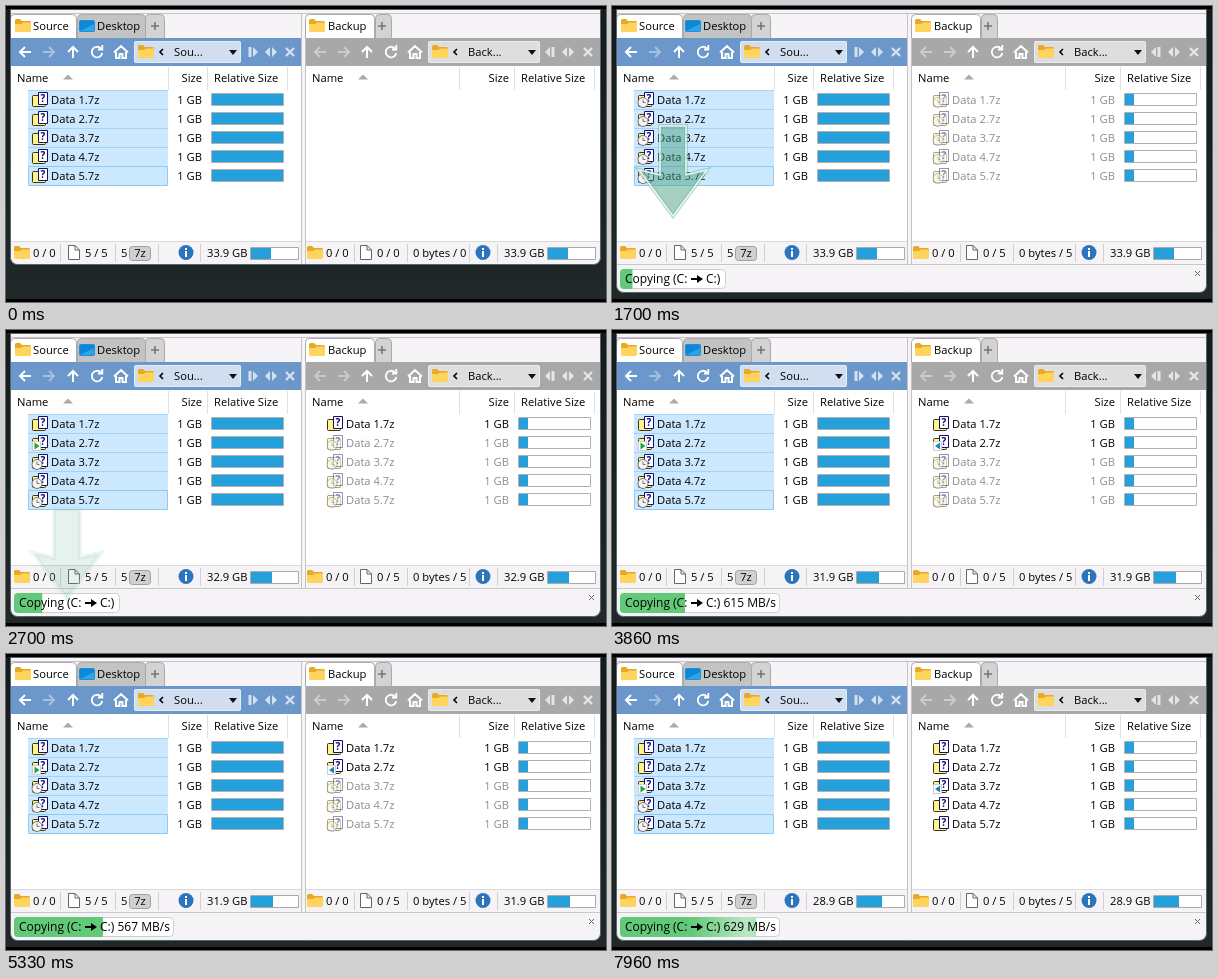
An HTML page with a canvas for the animation above (8 s loop, 600 by 296 pixels).

```html
<!DOCTYPE html>
<html>
<head>
<meta charset="utf-8">
<style>
html, body { margin: 0; width: 600px; height: 296px; overflow: hidden; background: #000; }
canvas { display: block; }
</style>
</head>
<body>
<canvas id="stage" width="600" height="296"></canvas>
<script>
const LOOP = 8000;
const c = document.getElementById('stage').getContext('2d');
const FONT = '11.2px "Open Sans", sans-serif';
const JOB_FONT = '12px "Open Sans", sans-serif';
const BLUE = '#26a0da';

// Progress fraction, free space and speed over time, as [ms, value]
const PROGRESS = [[1560, .08], [2100, .226], [3200, .3], [3860, .406], [4000, .43], [5330, .556],
  [5630, .556], [6030, .575], [6130, .6], [6330, .6], [7100, .756], [7960, .85]];
const FREE = [[0, 33.9], [1900, 32.9], [3300, 31.9], [5800, 30.9], [7350, 29.9], [7700, 28.9]];
const SPEED = [[0, ''], [3350, '615 MB/s'], [4300, '598 MB/s'], [4860, '567 MB/s'],
  [6400, '1.23 GB/s'], [7500, '629 MB/s']];
// Start and end of copying per file, as seen in each pane
const SOURCE_TIMES = [[2400, 2400], [2400, 5650], [5650, 9e9], [9e9, 9e9], [9e9, 9e9]];
const TARGET_TIMES = [[1800, 1800], [3250, 5700], [5700, 9e9], [7350, 7350], [7700, 7700]];

const stepAt = (steps, t) => steps.filter(s => s[0] <= t).pop()[1];

function lerpAt(points, t) {
  if (t <= points[0][0]) return points[0][1];
  const i = points.findIndex(p => p[0] > t);
  if (i < 0) return points[points.length - 1][1];
  const [t0, a] = points[i - 1], [t1, b] = points[i];
  return a + (b - a) * (t - t0) / (t1 - t0);
}

function rect(x, y, w, h, fill) {
  c.fillStyle = fill;
  c.fillRect(x, y, w, h);
}

function box(x, y, w, h, fill, stroke, radius = 0) {
  c.beginPath();
  c.roundRect(x + .5, y + .5, w - 1, h - 1, radius);
  c.fillStyle = fill;
  c.fill();
  c.strokeStyle = stroke;
  c.lineWidth = 1;
  c.stroke();
}

function text(s, x, y, color = '#000', align = 'left', font = FONT) {
  c.font = font;
  c.textAlign = align;
  c.fillStyle = color;
  c.fillText(s, x, y);
}

function shape(d, x, y, fill, stroke, width = 1) {
  const p = new Path2D(d);
  c.save();
  c.translate(x, y);
  if (fill) { c.fillStyle = fill; c.fill(p); }
  if (stroke) { c.strokeStyle = stroke; c.lineWidth = width; c.stroke(p); }
  c.restore();
}

function folder(x, y) {
  shape('M0 1.5Q0 0 1.5 0H5L7 2H14.5Q16 2 16 3.5V11H0Z', x, y, '#e9a825');
  shape('M0 5H6L8 3.5H16V11.5Q16 13 14.5 13H1.5Q0 13 0 11.5Z', x, y, '#ffd45c');
}

function fileIcon(x, y, state) {
  box(x, y + 3, 14, 12, '#fff48c', '#3a3410', 1);
  box(x + 6, y, 10, 13, '#fff', '#10106c');
  text('?', x + 11, y + 10, '#0c0c80', 'center', 'bold 10px "Open Sans", sans-serif');
  if (state === 'wait') {
    c.beginPath();
    c.arc(x + 5, y + 10.5, 5, 0, 7);
    c.fillStyle = '#f5f5f5';
    c.fill();
    c.strokeStyle = '#777';
    c.lineWidth = 1;
    c.stroke();
    shape('M0 -3V0H2.5', x + 5, y + 10.5, null, '#777');
  } else if (state === 'read' || state === 'write') {
    box(x, y + 6, 9, 10, '#fff', '#ccc');
    if (state === 'read') shape('M2.5 7.5L7.5 11L2.5 14.5Z', x, y, '#1ea53a');
    else shape('M7 7.5L2 11L7 14.5Z', x, y, '#1f83b5');
  }
}

function toolbar(x, crumbX, crumbW, name, bg, crumbBg, icons, active) {
  rect(x, 32, 296, 28, bg);
  const white = '#fff', y = 46;
  c.globalAlpha = active ? 1 : .4;
  shape('M6 0H-5M0 -5L-5 0L0 5', icons[0], y, null, white, 2);
  c.globalAlpha = .4;
  shape('M-6 0H5M0 -5L5 0L0 5', icons[1], y, null, white, 2);
  c.globalAlpha = 1;
  shape('M0 6V-5M-5 0L0 -5L5 0', icons[2], y, null, white, 2);
  shape('M4 -3.5A5.3 5.3 0 1 0 5.3 1M5.3 -7V-2.5H1', icons[3], y, null, white, 1.8);
  shape('M-7 .5L0 -6L7 .5M-5 0V6H-1.5V2H1.5V6H5V0', icons[4], y, null, white, 2);
  box(crumbX, 35, crumbW, 22, crumbBg, '#e8edf3', 1);
  folder(crumbX + 4, 39);
  shape('M2 -3L-1 0L2 3', crumbX + 27, y, null, '#000', 1.6);
  text(name, crumbX + 40, 50);
  shape('M-4 -2H4L0 3Z', crumbX + crumbW - 8, y, '#111');
  c.globalAlpha = .7;
  const dir = active ? 1 : -1;
  rect(icons[5] - 3 * dir - 1.5, y - 5, 3, 10, white);
  shape(`M0 -5L${5 * dir} 0L0 5Z`, icons[5], y, white);
  shape('M-1 -5L-6 0L-1 5ZM1 -5L6 0L1 5Z', icons[6], y, white);
  shape('M-4 -4L4 4M4 -4L-4 4', icons[7], y, null, white, 2.4);
  c.globalAlpha = 1;
}

function tab(x, w, fill) {
  box(x, 8, w, 28, fill, '#aaa', [4, 4, 0, 0]);
}

function header(nameX, sizeRight, relX, seps) {
  text('Name', nameX, 76);
  shape('M-5 2.5H5L0 -2.5Z', nameX + 51, 71, '#aaa');
  text('Size', sizeRight, 76, '#000', 'right');
  text('Relative Size', relX, 76);
  for (const x of seps) rect(x, 61, 1, 23, '#e0e0e0');
}

function fileRow(i, x, sizeRight, barX, fillW, state, alpha) {
  const y = 84 + i * 19;
  c.globalAlpha = alpha;
  fileIcon(x, y + 2, state);
  text(`Data ${i + 1}.7z`, x + 19, y + 14);
  text('1 GB', sizeRight, y + 14, '#000', 'right');
  c.globalAlpha = 1;
  box(barX, y + 3, 73, 13, '#fff', '#b0b0b0');
  rect(barX + 1, y + 4, fillW, 11, BLUE);
}

function statusBar(x, files, filesX, seps, infoX, free) {
  folder(x + 4, 240);
  text('0 / 0', x + 23, 251);
  shape('M.5 .5H7L11.5 5V14.5H.5ZM7 .5V5H11.5', filesX - 17, 239, '#fff', '#666');
  text(files, filesX, 251);
  for (const s of seps) rect(s, 238, 1, 18, '#d0d0d0');
  c.beginPath();
  c.arc(infoX, 246.5, 7.5, 0, 7);
  c.fillStyle = '#2c74bb';
  c.fill();
  rect(infoX - 1, 242, 2, 2, '#fff');
  rect(infoX - 1, 245, 2, 6, '#fff');
  text(free.toFixed(1) + ' GB', infoX + 21, 251);
  box(infoX + 64, 241, 49, 13, '#fff', '#aaa');
  rect(infoX + 65, 242, 20 + (33.9 - free), 11, BLUE);
}

function progressPanel(t) {
  rect(4, 258, 592, 30, '#f5f3f5');
  rect(4, 258, 592, 1, '#c8c8c8');
  const speed = stepAt(SPEED, t), w = speed ? 160 : 106;
  box(8, 263, w, 20, '#fff', '#cfcfcf', 4);
  c.save();
  c.beginPath();
  c.roundRect(8, 263, w, 20, 4);
  c.clip();
  const fillW = w * lerpAt(PROGRESS, t);
  rect(8, 263, fillW, 20, '#62c978');
  // Highlight sweeping across the filled part
  if (t > 4030) {
    const x = -55 + ((t - 4030) % 3070) * .22;
    const shine = c.createLinearGradient(x - 55, 0, x + 55, 0);
    shine.addColorStop(0, '#fff0');
    shine.addColorStop(.5, '#ffffff90');
    shine.addColorStop(1, '#fff0');
    rect(8, 263, fillW, 20, shine);
  }
  c.restore();
  text('Copying (C:', 13, 277, '#000', 'left', JOB_FONT);
  shape('M0 0H8', 79, 273, null, '#000', 2);
  shape('M6 -4L12 0L6 4Z', 79, 273, '#000');
  text('C:) ' + speed, 94, 277, '#000', 'left', JOB_FONT);
  shape('M-2.5 -2.5L2.5 2.5M2.5 -2.5L-2.5 2.5', 585.5, 267.5, null, '#666');
}

function dropArrow(t) {
  const p = (t - 1500) / 1600;
  if (p < 0 || p >= 1) return;
  c.save();
  c.globalAlpha = 1 - p;
  c.translate(61, 105 + 87 * (1 - (1 - p) ** 1.3));
  const d = 'M-13 1H13V50L34 45L0 91L-34 45L-13 50Z';
  shape(d, 0, 0, '#4fa58594', '#6fb59c90', 4);
  shape(d, 0, 0, null, '#f4fcf8', 1.6);
  c.restore();
}

function draw(t) {
  const queued = t >= 660, opened = t >= 1500, panel = t >= 1560, free = stepAt(FREE, t);
  const bottom = opened ? 287 : 259;
  rect(0, 0, 600, 296, '#000');
  const desk = c.createLinearGradient(0, 3, 0, 293);
  desk.addColorStop(0, '#151a1c');
  desk.addColorStop(1, '#20282a');
  rect(0, 3, 600, 290, desk);

  const frameShape = new Path2D();
  frameShape.roundRect(4.5, 3.5, 590, bottom - 4, [0, 0, 7, 7]);
  c.save();
  c.clip(frameShape);
  rect(4, 3, 592, 256, '#f6f4f6');
  rect(4, 7, 592, 1, '#cbbdcb');
  if (opened) rect(4, 258, 592, 30, '#1a2022');

  tab(71, 69, '#c3c3c3');
  tab(139, 20, '#d3d3d3');
  tab(4, 67, '#fff');
  tab(369, 17, '#d3d3d3');
  tab(299, 70, '#fff');
  folder(9, 13);
  text('Source', 27, 24);
  box(73, 14, 16, 12, '#0d87d8', '#1b90dc', 1);
  shape('M1 11L15 4V11Z', 73, 14, '#2ea4e6');
  text('Desktop', 91, 24);
  folder(303, 13);
  text('Backup', 322, 24);
  for (const x of [149, 376]) shape('M-4 0H4M0 -4V4', x, 20, null, '#777', 1.6);

  toolbar(4, 128, 107, 'Sou...', '#6b97cb', '#d0def0', [19, 43, 67, 91, 115, 247, 265, 284], true);
  toolbar(299, 422, 112, 'Back...', '#a8a8a8', '#dedede', [314, 338, 361, 385, 409, 544, 562, 582], false);
  rect(4, 60, 592, 176, '#fff');
  header(11, 196, 208, [162, 201, 281]);
  header(306, 503, 515, [453, 508, 588]);

  rect(22, 84, 140, 95, '#cce8ff');
  for (let i = 0; i < 4; i++) rect(22, 84 + i * 19, 140, 1, '#a5d3f5');
  box(22, 160, 140, 20, '#cce8ff', '#8fcaf5');
  for (let i = 0; i < 5; i++) {
    const [readFrom, readTo] = SOURCE_TIMES[i], [writeFrom, writeTo] = TARGET_TIMES[i];
    const source = !queued || t >= readTo ? 'done' : t >= readFrom ? 'read' : 'wait';
    fileRow(i, 26, 196, 205, 71, source, 1);
    if (!queued) continue;
    const target = t >= writeTo ? 'done' : t >= writeFrom ? 'write' : 'wait';
    fileRow(i, 321, 503, 512, 9, target, target === 'wait' ? .45 : 1);
  }

  rect(4, 236, 592, 22, '#f5f3f5');
  rect(4, 235, 592, 1, '#d8d8d8');
  statusBar(4, '5 / 5', 79, [54, 109, 152, 194], 180, free);
  text('5', 115, 251);
  box(123, 240, 22, 15, '#d0d0d0', '#a0a0a0', 3);
  text('7z', 134, 251, '#000', 'center');
  const count = queued ? 5 : 0;
  statusBar(297, '0 / ' + count, 371, [348, 401, 463, 491], 477, free);
  text('0 bytes / ' + count, 407, 251);
  rect(295, 8, 1, 250, '#c4c4c4');
  rect(296, 32, 3, 226, '#f6f4f6');
  rect(299, 32, 1, 226, '#c4c4c4');
  if (panel) progressPanel(t);
  dropArrow(t);
  c.restore();

  c.strokeStyle = '#56666d';
  c.lineWidth = 1;
  c.stroke(frameShape);
}

function frame() {
  draw(performance.now() % LOOP);
  requestAnimationFrame(frame);
}
frame();
</script>
</body>
</html>
```
